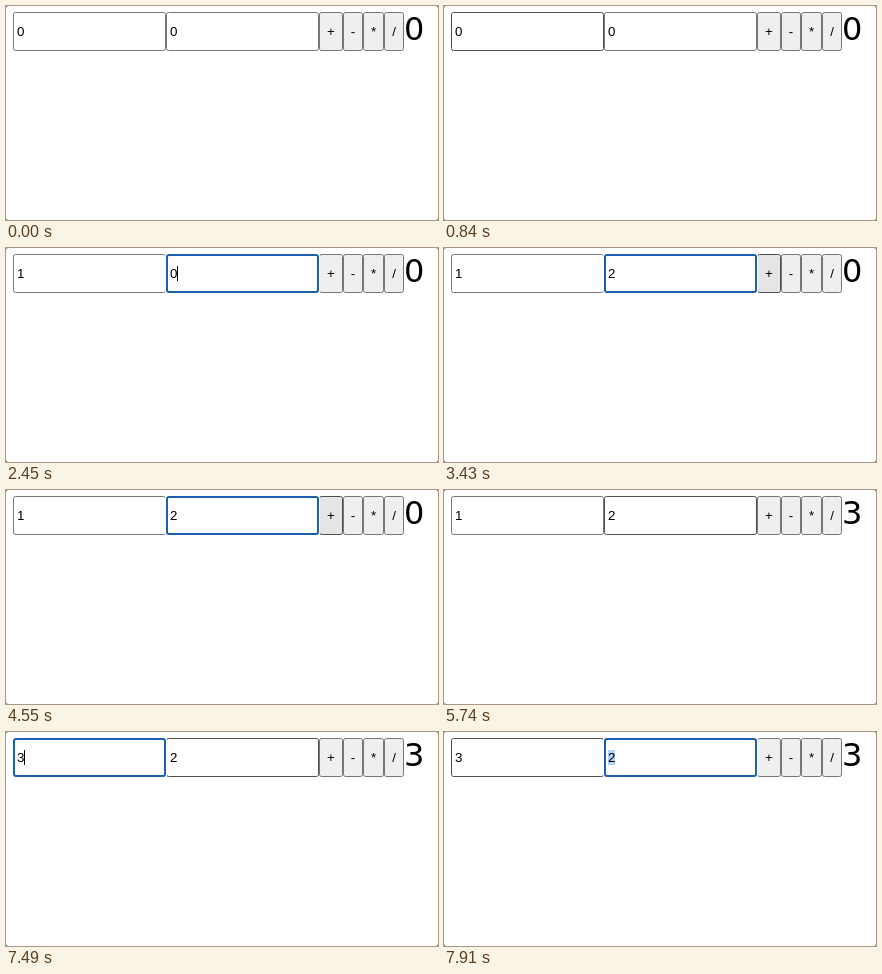
Animation of 432x214 px, one loop 8000 ms. Source, as an HTML page:

```html
<!DOCTYPE html>
<html lang="en">
<head>
<meta charset="utf-8">
<title>Calculator</title>
<style>
  html, body { margin: 0; width: 100%; height: 100%; overflow: hidden; background: #555; }
  #stage { position: relative; width: 432px; height: 214px; overflow: hidden; border-radius: 2px;
           background: #fff; color: #000; font: 13.333px/37px "Liberation Sans", Arial, sans-serif; }
  .box { position: absolute; top: 6px; height: 39px; box-sizing: border-box;
         border: 1px solid #767676; border-radius: 2.5px; white-space: pre; }
  .field { width: 153px; padding-left: 3px; background: #fff; }
  .button { background: #efefef; text-align: center; }
  .field.hover { border-color: #4f4f4f; }
  .button.hover { background: #e5e5e5; border-color: #4f4f4f; }
  .button.pressed { background: #f5f5f5; border-color: #8d8d8d; }
  .field.focus { z-index: 1; border: 2px solid #1c5fae; padding-left: 2px; line-height: 35px;
                 border-radius: 3px; box-shadow: 0 0 0 1px #fff; }
  .field.caret::after { content: ""; position: absolute; top: 10px; left: 9px;
                        width: 1px; height: 15px; background: #000; }
  .field.selected span { background: #b3d4f8; }
  .field span { display: inline-block; line-height: 15px; }
  #result { position: absolute; left: 398px; top: 4px; font: 32px/38px "DejaVu Sans", Verdana, sans-serif; }
</style>
</head>
<body>
<div id="stage">
  <div class="box field" id="a" style="left:7px"><span></span></div>
  <div class="box field" id="b" style="left:160px"><span></span></div>
  <div class="box button" id="add" style="left:313px;width:24px">+</div>
  <div class="box button" id="sub" style="left:337px;width:20px">-</div>
  <div class="box button" id="mul" style="left:357px;width:21px">*</div>
  <div class="box button" id="div" style="left:378px;width:20px">/</div>
  <div id="result"></div>
</div>
<script>
const LOOP = 8000;
const START = { a: 0, b: 0, result: 0, hover: "", focus: "", mark: "", pressed: "" };

// Each step lists only what changes at that time.
const STEPS = [
  [840, { hover: "a" }],
  [1120, { focus: "a", mark: "caret" }],
  [1750, { mark: "selected" }],
  [2100, { a: 1, mark: "caret" }],
  [2170, { hover: "b" }],
  [2450, { focus: "b" }],
  [2590, { mark: "selected" }],
  [2940, { b: 2, mark: "caret" }],
  [3430, { hover: "add", mark: "" }],
  [3500, { hover: "sub" }],
  [3990, { mark: "caret" }],
  [4550, { hover: "add", mark: "" }],
  [4900, { focus: "", pressed: "add" }],
  [4970, { result: 3, pressed: "" }],
  [5740, { hover: "b" }],
  [6300, { hover: "a" }],
  [6790, { focus: "a", mark: "caret" }],
  [6930, { mark: "selected" }],
  [7490, { a: 3, mark: "caret", hover: "b" }],
  [7630, { focus: "b" }],
  [7840, { mark: "selected" }],
  [7910, { hover: "a" }]
];

const boxes = [...document.querySelectorAll(".box")];
const result = document.getElementById("result");
const stateAt = time => Object.assign({}, START,
  ...STEPS.filter(([at]) => at <= time).map(([, change]) => change));

function render(time) {
  const state = stateAt(time);
  for (const box of boxes) {
    const focused = state.focus === box.id;
    box.classList.toggle("hover", state.hover === box.id);
    box.classList.toggle("pressed", state.pressed === box.id);
    box.classList.toggle("focus", focused);
    for (const mark of ["caret", "selected"])
      box.classList.toggle(mark, focused && state.mark === mark);
    if (box.id in state) box.firstChild.textContent = state[box.id];
  }
  result.textContent = state.result;
}

const begin = performance.now();
function tick() {
  render((performance.now() - begin) % LOOP);
  requestAnimationFrame(tick);
}
tick();
</script>
</body>
</html>
```
